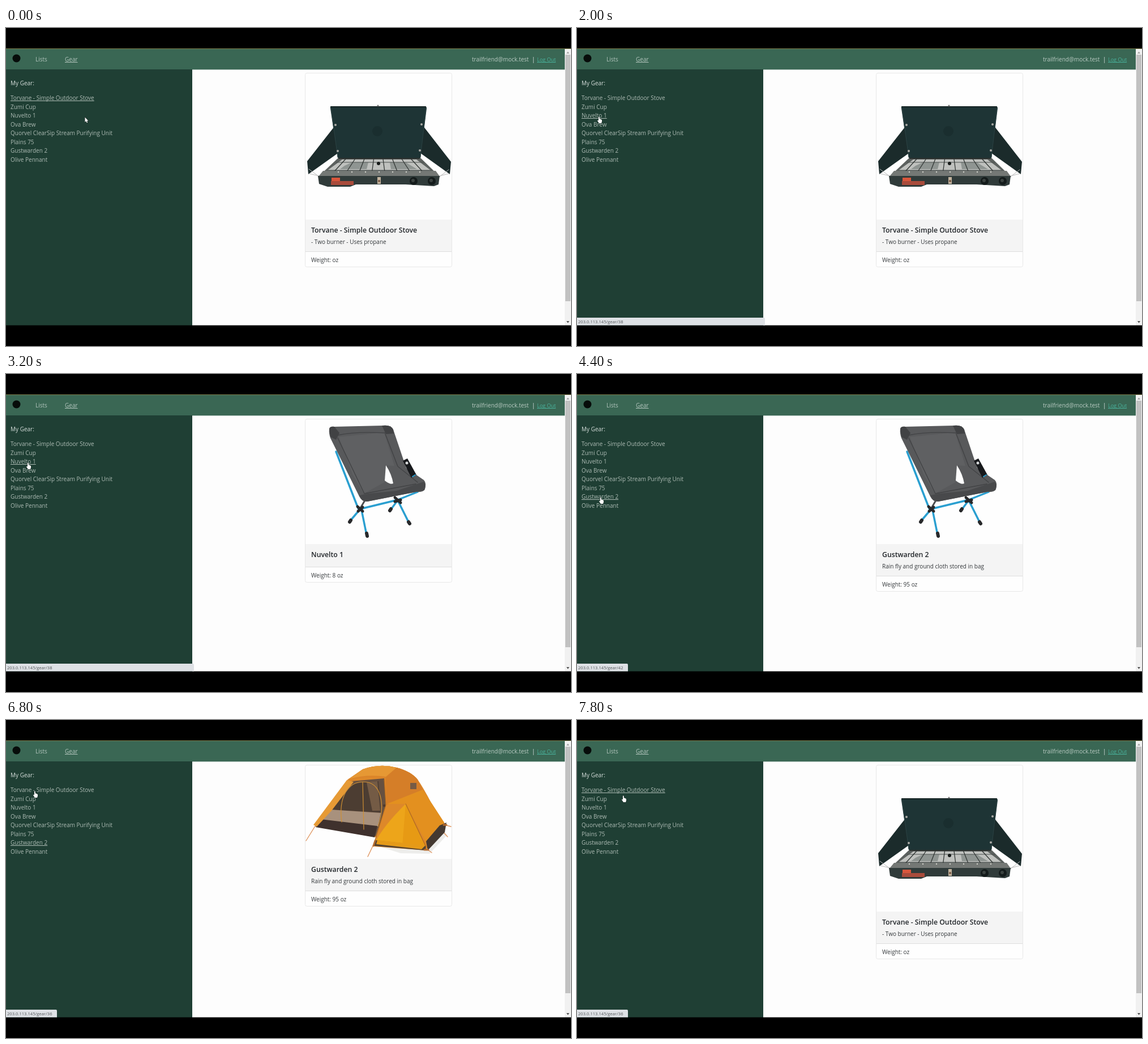
Animation of 998 by 561 pixels, one loop 8000 ms. Source, as an HTML page with a canvas:

```html
<!DOCTYPE html>
<html lang="en">
<head>
<meta charset="utf-8">
<title>My Gear</title>
<style>
html, body { margin: 0; width: 100%; height: 100%; overflow: hidden; background: #000; }
canvas { display: block; }
</style>
</head>
<body>
<canvas id="stage" width="998" height="561"></canvas>
<script>
const ctx = document.getElementById('stage').getContext('2d');
const LOOP = 8000;
const FONT = '"Open Sans", "Noto Sans", sans-serif';
const HOST = '203.0.113.145/gear/';
const PAGE_BOTTOM = 524.5;

const gear = [
  'Torvane - Simple Outdoor Stove', 'Zumi Cup', 'Nuvelto 1', 'Ova Brew',
  'Quorvel ClearSip Stream Purifying Unit', 'Plains 75', 'Gustwarden 2', 'Olive Pennant'
];

const cards = {
  stove: { title: gear[0], note: '- Two burner - Uses propane', weight: 'Weight: oz' },
  chair: { title: gear[2], weight: 'Weight: 8 oz' },
  tent: { title: gear[6], note: 'Rain fly and ground cloth stored in bag', weight: 'Weight: 95 oz' }
};

// Each track lists [start time, value]; values hold until the next entry.
const cursorTrack = [
  [0, ['arrow', 139, 157]], [800, ['arrow', 83, 158]], [1000, ['arrow', 52, 160]],
  [1200, ['hand', 36, 156]], [3400, ['hand', 36, 190]], [3600, ['hand', 37, 207]],
  [3800, ['hand', 39, 217]], [5800, ['hand', 40, 179]], [6000, ['hand', 47, 125]],
  [6600, ['hand', 48, 125]], [7800, ['hand', 79, 133]]
];
const linkTrack = [[0, null], [1400, 38], [3400, 40], [3600, 41], [3800, 42], [5800, 40], [6000, 36]];
const selectedTrack = [[0, 0], [2000, 2], [4400, 6], [7000, 0]];
const cardTrack = [[0, 'stove'], [2200, 'chair'], [4400, 'tent'], [7000, 'stove']];
const photoTrack = [[0, 'stove'], [2200, 'chair'], [4600, 'tent'], [7000, 'stove']];

const at = (track, t) => track.filter(([start]) => start <= t).pop()[1];

function rect(x, y, w, h, color) {
  ctx.fillStyle = color;
  ctx.fillRect(x, y, w, h);
}

function shape(d, color) {
  ctx.fillStyle = color;
  ctx.fill(new Path2D(d));
}

function line(d, color, width = 1) {
  ctx.strokeStyle = color;
  ctx.lineWidth = width;
  ctx.lineCap = ctx.lineJoin = 'round';
  ctx.stroke(new Path2D(d));
}

function disc(x, y, r, color) {
  ctx.fillStyle = color;
  ctx.beginPath();
  ctx.arc(x, y, r, 0, Math.PI * 2);
  ctx.fill();
}

function text(str, x, y, color, { size = 10, weight = 400, underline = false } = {}) {
  ctx.font = `${weight} ${size}px ${FONT}`;
  ctx.fillStyle = color;
  ctx.fillText(str, x, y);
  if (underline) ctx.fillRect(x, Math.round(y) + 1, ctx.measureText(str).width, 1);
}

function drawStove() {
  // wind panels and lid
  shape('M583 170 L532 235 L534 258 L586 221 Z', '#1b2b2b');
  shape('M733 168 L786 236 L784 258 L731 220 Z', '#1b2b2b');
  shape('M575 138 H740 Q743 138 743 142 L732 229 H586 L573 142 Q572 138 575 138 Z', '#1e3435');
  line('M574 139 H741', '#152424', 2);
  line('M574 141 L586 228 M742 141 L732 228', '#2b4142');
  disc(657, 137, 1.5, '#777');
  disc(656, 182, 9, '#1a2e2f');
  for (const [x, y] of [[582, 171], [734, 170], [586, 217], [731, 216]]) disc(x, y, 2, '#aaa9a5');

  // cooking tray and grate
  shape('M587 229 H732 L766 262 H552 Z', '#5d6260');
  shape('M594 232 H725 L750 251 H568 Z', '#bfc1be');
  shape('M598 243 L611 237 H640 L637 249 H590 Z', '#8f9592');
  shape('M678 237 H706 L726 249 H680 Z', '#8f9592');
  line('M588 230 H730', '#2a302e', 2);
  line('M583 237 H738 M568 251 H752', '#4b504e');
  for (let i = 0; i < 8; i++) line(`M${600 + i * 16.5} 231 L${579 + i * 22.5} 254`, '#323735', 1.3);
  disc(658, 239, 3, '#141817');
  shape('M560 252 H759 L767 263 H551 Z', '#747875');
  for (let i = 0; i < 7; i++) disc(587 + i * 24, 254, 1.2, '#d0d1ca');
  line('M535 249 L553 262 M536 257 L553 261 M782 250 L766 262 M782 257 L766 261', '#bbb');

  // front panel
  shape('M551 261 H766 L764 276 L756 279 L706 276 H618 L608 280 H568 L553 275 Z', '#303b3a');
  rect(575, 264, 15, 6, '#d9563c');
  rect(574, 270, 40, 7, '#a94b3b');
  rect(656, 263, 6, 12, '#c4b49f');
  disc(659, 270, 2, '#765742');
  for (const x of [720, 752]) {
    disc(x, 270, 7, '#141b1b');
    disc(x - 1, 269, 3, '#3b4240');
  }
}

function drawChair() {
  const blue = '#2a9fd0', black = '#28292b';
  line('M583 137 L622 237', blue, 3.5);
  line('M626 238 L692 222 L727 208 M625 239 L608 259', blue, 3.5);
  line('M628 240 L637 284 M692 223 L712 263 M691 224 L679 240', blue, 3.5);
  line('M634 223 L625 238', '#4b4c4e', 3);
  shape('M571 97 Q572 92 580 93 L666 91 Q680 89 684 98 L707 166 L738 187 Q743 192 740 203 Q738 209 725 208 L638 225 Q629 226 624 216 L573 113 Q570 104 571 97 Z', '#58595b');
  shape('M588 111 L668 103 L686 162 L670 161 L672 189 L632 211 L612 177 Z', '#5f6062');
  shape('M571 97 Q572 92 580 93 L589 104 L583 116 L573 111 Z', '#414244');
  shape('M664 91 Q680 89 684 98 L685 105 L671 106 Z', '#414244');
  shape('M624 214 L640 211 L690 206 L738 190 Q743 195 739 205 L638 225 Q629 226 624 214 Z', '#48494b');
  line('M586 108 Q617 101 670 104 M586 113 L633 211 L724 194 M670 106 L692 163 L727 191', '#424345', 1.4);
  shape('M671 161 Q681 176 684 193 Q679 196 669 188 Z', '#fdfdfd');
  shape('M701 153 L709 149 L725 178 L716 183 Z', '#17191c');
  line('M718 181 L723 178', blue, 2);
  disc(708, 157, 2.5, '#d5d7d8');
  line('M621 234 L630 242 M622 242 L630 235 M687 218 L697 227 M687 225 L697 222', black, 5);
  line('M609 258 L607 261 M637 281 L638 286 M711 261 L713 264 M680 238 L678 241', black, 6);
}

function drawTent() {
  // ground shadow, fly and door
  shape('M656 222 L746 228 L774 197 L779 203 L748 236 L697 235 Z', '#ededeb');
  line('M548 184 L530 213 M651 216 L639 241 M771 184 L786 188 M741 226 L752 234 M766 191 L780 206', '#df9660', 1.4);
  shape('M602 107 L630 87 Q660 76 690 84 Q716 91 727 105 Q737 119 751 146 L776 184 L742 230 L649 223 L654 207 L546 188 Z', '#dd882a');
  shape('M610 108 L668 103 L671 150 L653 205 L549 187 Z', '#665040');
  shape('M615 112 L658 108 L662 163 L572 158 Z', '#4c3d32');
  shape('M637 110 L656 108 L661 160 L647 160 Z', '#745b45');
  shape('M572 158 L662 164 L657 188 L555 179 Z', '#a8917d');
  shape('M556 175 L656 187 L651 207 L547 189 Z', '#3f312d');
  shape('M602 106 L614 109 L575 160 L549 188 L543 185 Z', '#e69a35');
  line('M593 180 C587 136 604 109 631 109 C664 109 670 151 657 187 M630 109 L632 193', '#cf8f33', 1.2);

  // canopy and side panels
  shape('M602 106 L630 87 Q660 76 690 84 Q716 91 727 105 L736 123 L671 145 L668 103 Q637 98 602 106 Z', '#da8429');
  shape('M630 87 Q660 76 690 84 L671 100 Q638 95 606 104 Z', '#e69834');
  shape('M671 101 L690 84 Q716 91 727 105 L736 123 L672 150 Z', '#d57e28');
  shape('M673 148 L736 123 L752 147 L774 181 L742 215 L706 148 Z', '#e3901f');
  shape('M706 148 L742 226 L650 219 Q667 186 706 148 Z', '#eda51a');
  shape('M706 148 L742 226 L700 222 Z', '#e79a14');
  shape('M652 212 L742 222 L741 230 L649 222 Z', '#554331');
  shape('M656 212 L741 221 L734 228 L654 219 Z', '#e59a18');
  shape('M742 214 L766 186 L778 181 L775 198 L745 230 Z', '#443931');
  line('M668 105 L671 150 L650 218 M706 148 L742 224', '#b06a22', 1.2);
  line('M739 229 H746 M649 222 L652 213 M773 185 H778', '#b46c30', 3);
  disc(668, 151, 2.2, '#503a2d');
  rect(714, 111, 11, 11, '#765b45');
}

const photos = {
  stove: { bottom: 338, draw: drawStove },
  chair: { bottom: 300, draw: drawChair },
  tent: { bottom: 245, draw: drawTent }
};

function drawCard(card, photo) {
  const top = photo.bottom;
  const split = top + (card.note ? 57 : 41);
  const bottom = split + 27;
  ctx.fillStyle = '#fefefe';
  ctx.strokeStyle = '#e8e8e8';
  ctx.lineWidth = 1;
  ctx.beginPath();
  ctx.roundRect(528.5, 79.5, 259, bottom - 80, 3);
  ctx.fill();
  ctx.stroke();
  photo.draw();
  rect(529, top, 258, split - top, '#f4f4f4');
  rect(529, split - 1, 258, 1, '#dedede');
  text(card.title, 539, top + 22.5, '#212529', { size: 12.3, weight: 600 });
  if (card.note) text(card.note, 539, top + 43, '#34383b');
  text(card.weight, 539, split + 17.5, '#34383b');
}

function drawPage() {
  rect(0, 0, 998, 561, '#000');
  rect(0, 37, 987, 37, '#3a6754');
  rect(0, 36, 998, 1, '#7a7a48');
  rect(329, 73.4, 658, PAGE_BOTTOM - 73.4, '#fdfdfd');
  rect(0, 73, 329, PAGE_BOTTOM - 73, '#1f3f34');

  disc(18.5, 53.5, 7, '#070c0a');
  text('Lists', 52, 59, '#b3c5bd');
  text('Gear', 104, 59, '#b3c5bd', { underline: true });
  text('trailfriend@mock.test', 823, 59, '#b9cac2');
  text('|', 929, 59, '#e3ebe7');
  text('Log Out', 938, 58.5, '#49b39d', { size: 9, underline: true });

  rect(987, 37, 11, PAGE_BOTTOM - 37, '#f1f1f1');
  rect(988, 47, 9, 435, '#c1c1c1');
  shape('M990 45 L992.5 41.5 L995 45 Z', '#a3a3a3');
  shape('M990 517 L992.5 520.5 L995 517 Z', '#505050');
}

function drawList(selected) {
  text('My Gear:', 8, 101, '#d6dedb');
  gear.forEach((name, i) =>
    text(name, 8, 127 + i * 15.55, '#adbbb4', { underline: i === selected }));
}

function drawStatus(t) {
  const link = at(linkTrack, t);
  if (!link) return;
  const width = t >= 2000 && t < 3400 ? 332 : 90;
  ctx.save();
  if (t < 1600) ctx.globalAlpha = 0.6;
  ctx.fillStyle = '#dee1e5';
  ctx.beginPath();
  ctx.roundRect(0, 511, width, PAGE_BOTTOM - 511, [0, 2, 0, 0]);
  ctx.fill();
  text(HOST + link, 2, 520.5, '#515558', { size: 7.6 });
  ctx.restore();
}

function drawCursor([kind, x, y]) {
  ctx.save();
  ctx.translate(x, y);
  if (kind === 'arrow') {
    const d = 'M.5 .5 V9 L2.4 7.2 L3.8 10.3 L5.2 9.7 L3.9 6.7 H6.4 Z';
    line(d, '#17221e');
    shape(d, '#fff');
  } else {
    const d = 'M2 1 Q3 0 3.7 1 V4.5 Q5 4 5.4 5 Q6.7 4.6 7 5.7 Q8 5.5 8 7 V9 L7 12 H3 L.3 8 Q-.3 6.7 1 6.8 L2 7.6 Z';
    line(d, '#27332f');
    shape(d, '#fff');
  }
  ctx.restore();
}

function frame(now) {
  const t = now % LOOP;
  drawPage();
  drawList(at(selectedTrack, t));
  drawCard(cards[at(cardTrack, t)], photos[at(photoTrack, t)]);
  drawStatus(t);
  drawCursor(at(cursorTrack, t));
}

let start;
function tick(now) {
  start ??= now;
  frame(Math.max(0, now - start));
  requestAnimationFrame(tick);
}
frame(0);
requestAnimationFrame(tick);
</script>
</body>
</html>
```
